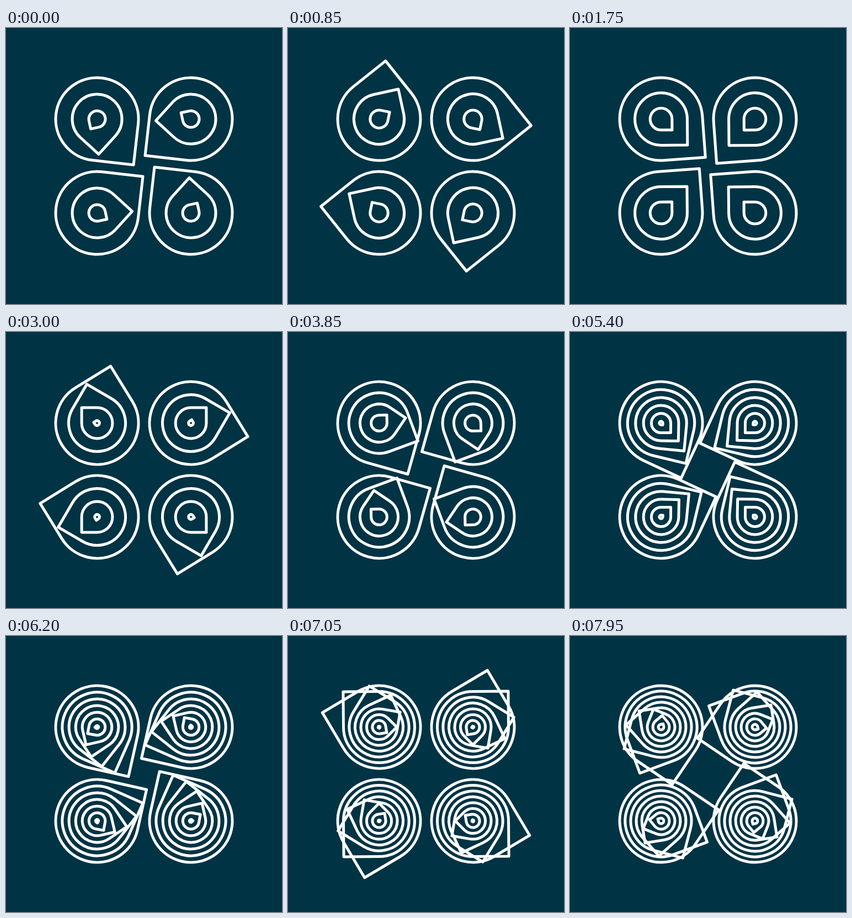
Animation, 500 px wide and 500 px high, one loop 8000 ms. Source, as an HTML page with a canvas:

```html
<!DOCTYPE html>
<html lang="en">
<head>
<meta charset="utf-8">
<title>Turning drops</title>
<style>
  html, body { margin: 0; width: 100%; height: 100%; overflow: hidden; background: #003344; }
  canvas { display: block; width: 500px; height: 500px; }
</style>
</head>
<body>
<canvas id="stage" width="500" height="500"></canvas>
<script>
const ctx = document.getElementById('stage').getContext('2d');
const LOOP = 8000, STEP = 50;
const OUTER_RADIUS = 75, OFFSET = 85;

// A circle with one square corner at (r, r).
function drop(r) {
  ctx.beginPath();
  ctx.arc(0, 0, r, Math.PI / 2, Math.PI * 2);
  ctx.lineTo(r, r);
  ctx.closePath();
  ctx.stroke();
}

function draw(ms) {
  const phase = 0.8 * ms / 1000 + 0.018;
  const gap = 20 + 10 * Math.cos(phase / 2);

  ctx.setTransform(1, 0, 0, 1, 0, 0);
  ctx.fillStyle = '#003344';
  ctx.fillRect(0, 0, 500, 500);
  ctx.strokeStyle = '#fff';
  ctx.lineWidth = 5;
  ctx.lineJoin = 'round';

  for (let quarter = 0; quarter < 4; quarter++) {
    for (let r = OUTER_RADIUS, ring = 0; r > 0; r -= gap, ring++) {
      ctx.setTransform(1, 0, 0, 1, 250, 250);
      ctx.rotate(quarter * Math.PI / 2);
      ctx.translate(-OFFSET, -OFFSET);
      ctx.rotate(2 * Math.PI * Math.sin(phase + 0.1 * ring));
      drop(r);
    }
  }
}

function tick() {
  const ms = performance.now() % LOOP;
  draw(Math.floor(ms / STEP) * STEP);
  requestAnimationFrame(tick);
}
tick();
</script>
</body>
</html>
```
